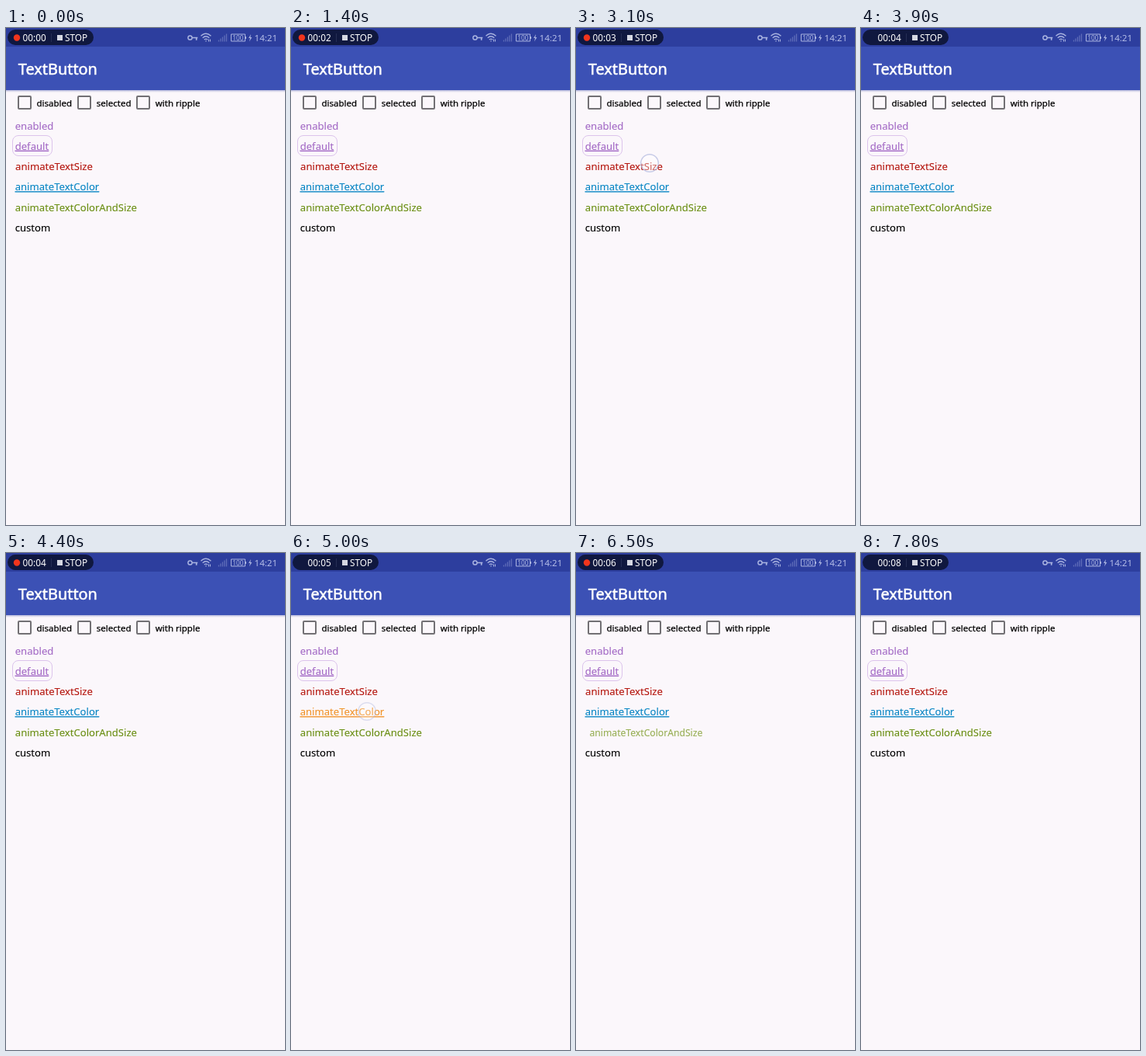
Write an HTML page that moves like this. It is 360 by 640 pixels and loops after 8000 ms.

```html
<!DOCTYPE html>
<html lang="en">
<head>
<meta charset="utf-8">
<title>TextButton</title>
<style>
  html, body { margin: 0; width: 100%; height: 100%; overflow: hidden; background: #fbf7fb; }
  svg { display: block; width: 360px; height: 640px; font-family: "Noto Sans", "Open Sans", sans-serif; }
  .status { font-size: 11.8px; fill: #fff; }
  .icons { fill: none; stroke: #a9b3e0; }
  .title { font-size: 19.9px; fill: #fff; stroke: #fff; stroke-width: .55; }
  .checks { font-size: 11.5px; }
  .checks text { stroke: #000; stroke-width: .25; }
  .checks rect { fill: none; stroke: #727074; stroke-width: 2; }
  .buttons { font-size: 13.1px; }
  .buttons text { fill: currentColor; stroke: currentColor; stroke-width: .12; }
  .link { text-decoration: underline; }
</style>
</head>
<body>
<svg viewBox="0 0 360 640">
  <defs>
    <linearGradient id="shade" x2="0" y2="1">
      <stop stop-color="#5a64b0" stop-opacity=".4"/>
      <stop offset="1" stop-color="#5a64b0" stop-opacity="0"/>
    </linearGradient>
  </defs>
  <rect width="360" height="640" fill="#fbf7fb"/>
  <rect width="360" height="80" fill="#3c51b5"/>
  <rect width="360" height="24" fill="#2d3e9e"/>
  <rect y="80" width="360" height="3" fill="url(#shade)"/>

  <g class="status">
    <rect x="2" y="2" width="111" height="20" rx="10" fill="#10183f"/>
    <circle id="dot" cx="14" cy="12.5" r="4.2" fill="#f2351c"/>
    <text id="clock" x="21.5" y="16.7">00:00</text>
    <path d="M58.5 7v11" stroke="#252d55"/>
    <rect x="66" y="9" width="7" height="7" fill="#d5d7e2"/>
    <text x="76" y="16.7">STOP</text>
    <text x="320.5" y="16.7" font-size="11.6" fill="#b4bde8">14:21</text>
    <text x="292.3" y="15.6" font-size="8.3" fill="#a9b3e0">100</text>
  </g>
  <g class="icons">
    <circle cx="237.5" cy="12.5" r="2.6" stroke-width="1.5"/>
    <path d="M240 12.5h7.3M245.7 12.5v3.2" stroke-width="1.7"/>
    <path d="M251.5 10.2q6.5-5.8 13 0M253.7 12.7q4.3-3.8 8.6 0M255.8 15q2.2-1.8 4.4 0" stroke-width="1.4"/>
    <path d="M258 16v1.6M261.5 14.5v3M263.5 14.5v3" stroke-width="1.1"/>
    <path d="M274.5 17.5v-2M277 17.5v-4M279.5 17.5v-6M282 17.5v-8M284.5 17.5v-10" stroke-width="1.3" opacity=".4"/>
    <path d="M290.5 8h18v9h-18zM309.5 11v3"/>
    <path d="M316 8l-3 5h2l-1 4.5 3.3-5.500h-2z" fill="#a9b3e0" stroke="none"/>
  </g>

  <text class="title" x="15.8" y="60">TextButton</text>

  <g class="checks">
    <rect x="16" y="88" width="16" height="16" rx="1"/><text x="39.5" y="100.6">disabled</text>
    <rect x="93" y="88" width="16" height="16" rx="1"/><text x="116.8" y="100.6">selected</text>
    <rect x="169" y="88" width="16" height="16" rx="1"/><text x="192.8" y="100.6">with ripple</text>
  </g>

  <rect x="8.5" y="138.5" width="51" height="26" rx="7.5" fill="none" stroke="#dcc3ec"/>
  <g class="buttons">
    <text x="11.7" y="130.5" color="#a46bc6">enabled</text>
    <text class="link" x="11.7" y="156.7" color="#a46bc6">default</text>
    <text id="size" x="62" y="183" text-anchor="middle" color="#b5170f">animateTextSize</text>
    <text id="color" class="link" x="11.7" y="209.2">animateTextColor</text>
    <text id="both" x="90.4" y="235.5" text-anchor="middle">animateTextColorAndSize</text>
    <text x="11.7" y="261.7">custom</text>
  </g>
  <circle id="touch" r="11.3" fill="#fff" fill-opacity=".5" stroke="#b4bbe0" stroke-width="1.4"/>
</svg>
<script>
const $ = id => document.getElementById(id);
const LOOP = 8000, STEP = 100, BLINK = 1050;
const BLUE = [8, 134, 196], ORANGE = [241, 148, 43];
const GREEN = [107, 143, 20], PALE = [197, 207, 150];

const touches = [
  { x: 95, y: 174, down: 2900, up: 3050 },
  { x: 98, y: 204, down: 4700, up: 4900 },
  { x: 98, y: 230, down: 5900, up: 6200 },
  { x: 45, y: 261, down: 7000, up: 7300 }
];

const clamp = v => Math.max(0, Math.min(1, v));
const ramp = (t, from, to) => clamp((t - from) / (to - from));
// Rises from a to b, holds, then falls from c to d.
const pulse = (t, a, b, c, d) => ramp(t, a, b) - ramp(t, c, d);
const mix = (p, q, k) => `rgb(${p.map((v, i) => Math.round(v + (q[i] - v) * k))})`;
const shrink = (el, base, k) => el.setAttribute("font-size", base * (1 - 0.145 * k));

function draw(now) {
  const t = Math.floor(now % LOOP / STEP) * STEP;

  $("clock").textContent = "00:0" + Math.floor((t + 750) / BLINK);
  $("dot").setAttribute("opacity", (t + 125) % BLINK < BLINK / 2 ? 1 : 0);

  shrink($("size"), 13.1, pulse(t, 3100, 3300, 3350, 3650));
  $("color").setAttribute("color", mix(BLUE, ORANGE, pulse(t, 4700, 4950, 5000, 5300)));
  const k = pulse(t, 5950, 6250, 6350, 6650);
  shrink($("both"), 13.1, k);
  $("both").setAttribute("color", mix(GREEN, PALE, k));

  const hit = touches.find(h => t >= h.down && t < h.up + 200);
  $("touch").setAttribute("opacity", hit ? 1 - ramp(t, hit.up, hit.up + 180) : 0);
  if (hit) {
    $("touch").setAttribute("cx", hit.x);
    $("touch").setAttribute("cy", hit.y);
  }
}

const start = performance.now();
(function frame() {
  draw(performance.now() - start);
  requestAnimationFrame(frame);
})();
</script>
</body>
</html>
```
